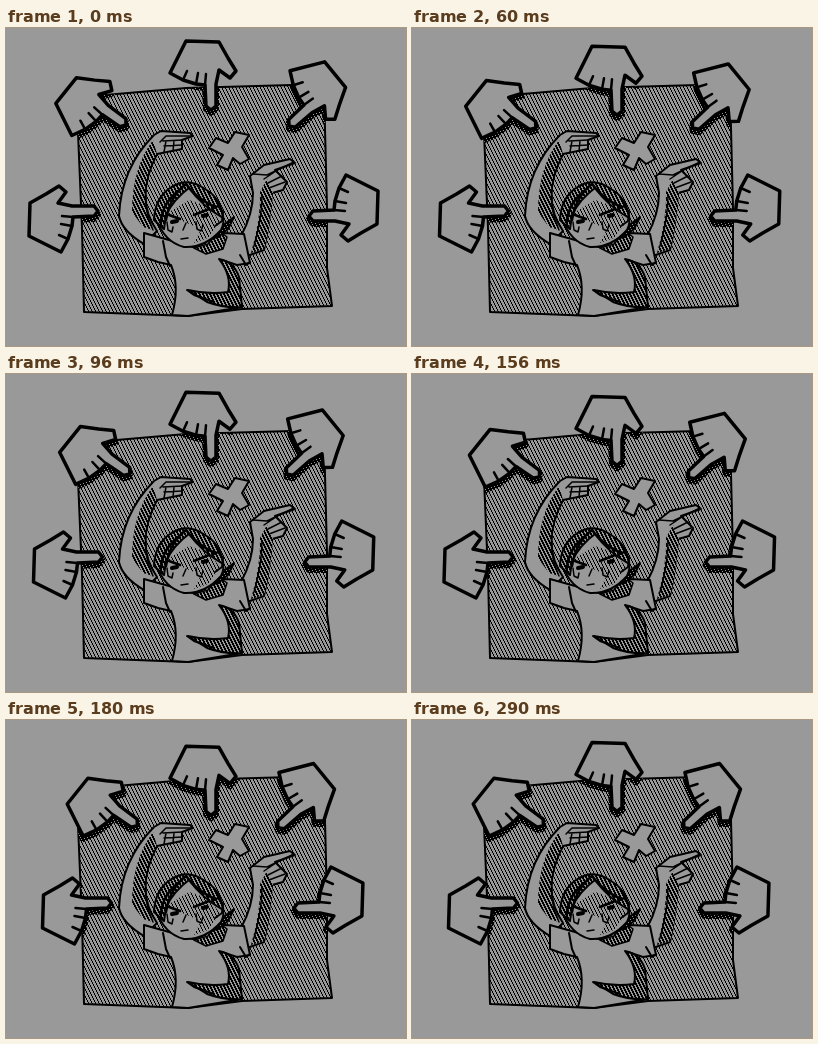
Write an HTML page with a canvas that moves like this. It is 400 by 318 pixels and loops after 350 ms.

```html
<!DOCTYPE html>
<html lang="en">
<head>
<meta charset="utf-8">
<title>Pointing hands</title>
<style>
html, body { margin: 0; height: 100%; overflow: hidden; background: #999; }
canvas { display: block; }
</style>
</head>
<body>
<canvas width="400" height="318"></canvas>
<script>
const ctx = document.querySelector('canvas').getContext('2d');
const GRAY = '#999', INK = '#000';

// Steep diagonal ink hatch; level is the number of inked pixels out of seven
function hatch(level) {
  const tile = document.createElement('canvas');
  tile.width = tile.height = 7;
  const t = tile.getContext('2d');
  for (let y = 0; y < 7; y++)
    for (let x = 0; x < 7; x++) {
      t.fillStyle = (2 * x - y + 7) % 7 < level ? INK : GRAY;
      t.fillRect(x, y, 1, 1);
    }
  return ctx.createPattern(tile, 'repeat');
}
const LIGHT = hatch(2), MID = hatch(4), DARK = hatch(6);

const panel = new Path2D('M72 72 76 69 180 60 286 57 318 61 321 180 321 240 326 278 236 281 182 288 78 284 76 200 72 105Z');

// One hand pointing right with its fingertip at the origin
const palm = new Path2D('M-39-25-32-19-40-8-26-5-4-5 0 0-4 5-25 6-26 15-30 28-37 41-69 25-68-8-52-17Z');
const knuckles = new Path2D('M-25 6-36 5M-26 15-37 13M-30 28-39 24');
const hands = [
  { x: 205, y: 82, angle: 90, travel: 17, ease: .85, back: 2 },
  { x: 92, y: 183, angle: 0, travel: 18, ease: 1, back: 1 },
  { x: 303, y: 188, angle: 180, travel: 21, ease: 1.15, back: 1 },
  { x: 120, y: 97, angle: 37, travel: 19, ease: 1, back: 1 },
  { x: 283, y: 98, angle: 139, travel: 22, ease: 1.4, back: 1 },
];

function line(path, width = 1.5, style = INK) {
  ctx.lineWidth = width;
  ctx.strokeStyle = style;
  ctx.stroke(path instanceof Path2D ? path : new Path2D(path));
}
function shape(path, fill, width = 2) {
  const p = path instanceof Path2D ? path : new Path2D(path);
  ctx.fillStyle = fill;
  ctx.fill(p);
  if (width) line(p, width);
}

function drawArms() {
  shape('M138 216Q116 203 113 188 115 140 148 107L155 103 184 105 187 108 176 112 176 121 151 126Q128 170 151 203Z', GRAY);
  shape('M147 112Q126 140 126 184L137 199 147 202Q130 165 151 126Z', MID, 0);
  line('M151 126Q130 165 147 202M154 114 160 108 186 108M157 113 176 112M158 118 176 117M160 113 158 124M168 113 167 123');

  shape('M235 208Q247 186 247 165L244 148 258 137 284 131 289 135 269 142 281 154 277 162 266 165Q263 200 258 222L241 228Z', GRAY);
  shape('M261 151 267 165Q264 200 258 221L245 225Q255 190 254 164Z', MID, 0);
  line('M256 167Q256 190 248 218M247 146 261 147 288 134M258 151 270 143M262 155 276 148M263 160 279 154');
}

function drawBody() {
  shape('M138 205 163 212 197 222 217 205 238 206 244 235 231 237 216 232Q230 251 236 279L182 288 166 287Q174 259 165 237L152 234 138 229Z', GRAY);
  shape('M188 220 202 216 213 203 221 209 217 221 200 226Z', MID, 1.5);
  shape('M213 231Q228 234 233 249L236 279Q217 280 201 274L182 262Q203 267 222 264 226 248 213 231Z', MID);
  line('M157 213 160 229 164 238M234 227 240 237 244 234M181 262 188 267 208 274', 2);
}

function drawHead() {
  shape('M204 207 228 189 222 201 211 210Z', DARK);
  shape('M150 190Q151 166 170 158 193 153 209 174 222 188 215 202 199 220 178 219 158 214 150 190Z', GRAY);
  shape('M160 186 183 172 204 179 214 194 202 210 188 215 195 201Z', LIGHT, 0);
  shape('M148 192Q149 170 164 160 181 148 199 161 215 170 217 190 196 178 183 160 168 171 160 187L158 201Z', MID);
  line('M180 156Q164 168 160 192M180 156Q191 171 209 179M176 160Q156 174 155 194', 2.5);
  line('M163 187 174 191M188 187 203 181', 2.5);
  line('M166 194 171 193M197 188 201 187', 4);
  line('M161 194 162 202 166 204 167 199M190 194 191 201 195 203 197 197M180 195 177 202M175 211 182 210');
  line('M206 181 212 178 217 184 216 193 209 198', 2);
}

function drawHand({ x, y, angle, travel, ease, back }, step) {
  const progress = step < 5 ? step / 4 : 1 - back / 4;
  const place = new DOMMatrix()
    .translate(x, y)
    .rotate(angle)
    .translate(travel * progress ** ease, 0);
  const outline = new Path2D(), marks = new Path2D();
  outline.addPath(palm, place);
  marks.addPath(knuckles, place);

  // The shadow falls on the panel only
  ctx.save();
  ctx.clip(panel);
  ctx.translate(0, 3);
  line(outline, 6, DARK);
  ctx.restore();

  shape(outline, GRAY, 3.5);
  line(marks, 2.5);
}

function draw(time) {
  const t = time % 350;
  const step = t < 290 ? Math.floor(t / 60) : 5;
  shape(panel, LIGHT);
  drawArms();
  drawBody();
  drawHead();
  shape('M229 104 243 107 236 119 243 131 234 136 227 130 222 142 211 137 217 127 203 120 210 110 222 115Z', GRAY);
  hands.forEach(hand => drawHand(hand, step));
}

ctx.lineJoin = ctx.lineCap = 'round';
let begin;
function tick(now) {
  begin ??= now;
  ctx.clearRect(0, 0, 400, 318);
  draw(now - begin);
  requestAnimationFrame(tick);
}
requestAnimationFrame(tick);
</script>
</body>
</html>
```
